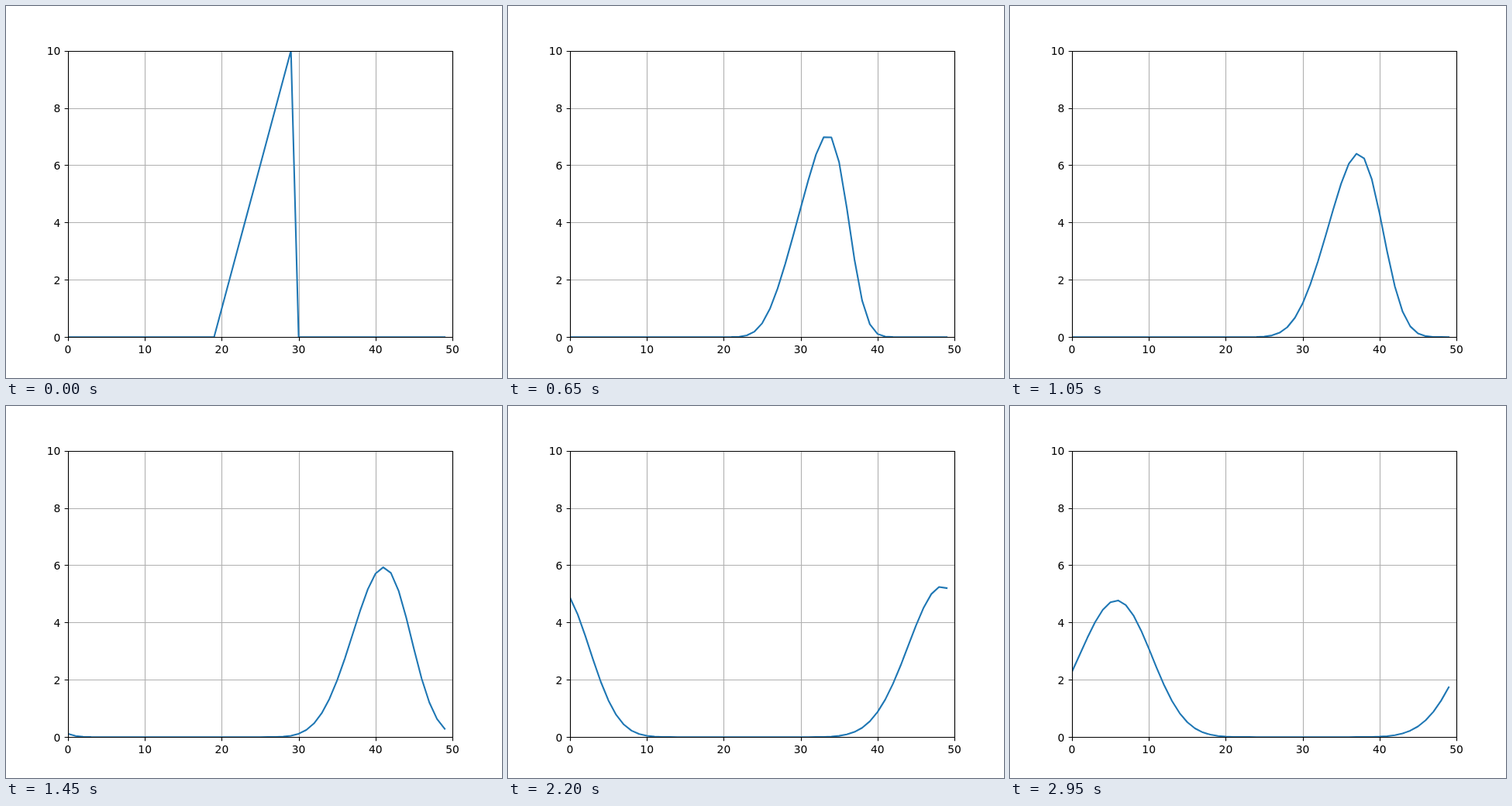
These frames come from a looping animation (640x480 px, 3 s). An HTML page:

```html
<!DOCTYPE html>
<html>
<head>
<meta charset="utf-8">
<style>
html, body { margin: 0; width: 100%; height: 100%; overflow: hidden; background: #fff; }
svg { display: block; }
text { font: 13.89px "DejaVu Sans", sans-serif; }
path { fill: none; stroke: #000; stroke-width: 1.11; }
#grid { stroke: #b0b0b0; }
#wave { stroke: #1f77b4; stroke-width: 2.083; stroke-linejoin: round; stroke-linecap: square; }
</style>
</head>
<body>
<svg width="640" height="480" viewBox="0 0 640 480">
  <clipPath id="plot"><rect x="80" y="58" width="496" height="369"/></clipPath>
  <path id="grid" clip-path="url(#plot)"/>
  <path id="ticks"/>
  <g clip-path="url(#plot)"><path id="wave"/></g>
  <path d="M80.5 58.5H576.5V427.5H80.5Z"/>
  <g id="labels"></g>
</svg>
<script>
const N = 50, FRAMES = 60, STEP = 50, COURANT = 0.5;
const get = id => document.getElementById(id);
const px = x => 80 + x * 9.92;
const py = y => 427.2 - y * 36.96;
const snap = v => Math.floor(v + 0.5) + 0.5;

function label(value, x, y, anchor) {
  const el = document.createElementNS("http://www.w3.org/2000/svg", "text");
  el.setAttribute("x", x);
  el.setAttribute("y", y);
  el.setAttribute("text-anchor", anchor);
  el.textContent = value;
  get("labels").append(el);
}

let grid = "", ticks = "";
for (let i = 0; i <= 5; i++) {
  const x = px(i * 10), y = py(i * 2), sx = snap(x), sy = snap(y);
  grid += `M${sx} 58V427M80 ${sy}H576`;
  ticks += `M${sx} 427.5v4.86M80.5 ${sy}h-4.86`;
  label(i * 10, x, 448, "middle");
  label(i * 2, 70.3, Math.round(y + 5.3), "end");
}
get("grid").setAttribute("d", grid);
get("ticks").setAttribute("d", ticks);

// Upwind advection of a ramp on a periodic domain
let u = Array.from({ length: N }, (_, i) => i > 19 && i < 30 ? i - 19 : 0);
const paths = [];
for (let n = 0; n < FRAMES; n++) {
  paths.push("M" + u.map((v, i) => px(i).toFixed(2) + " " + py(v).toFixed(2)).join("L"));
  u = u.map((v, i) => v - COURANT * (v - u[(i + N - 1) % N]));
}

function draw() {
  const n = Math.floor(performance.now() / STEP) % FRAMES;
  get("wave").setAttribute("d", paths[n]);
  requestAnimationFrame(draw);
}
draw();
</script>
</body>
</html>
```
